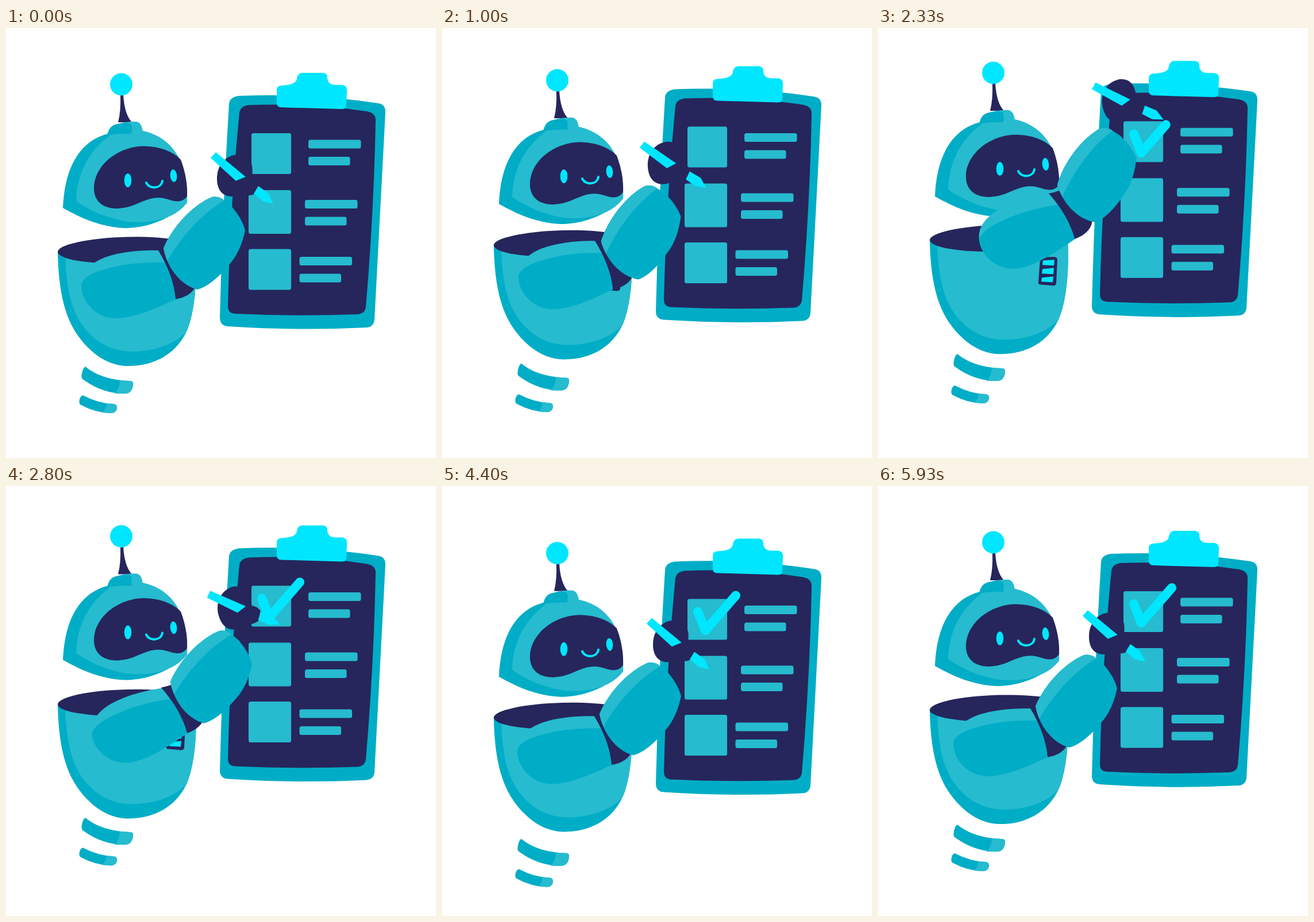
Animation of 748 by 748 pixels, one loop 5990 ms. Source, as an HTML page:

```html
<!DOCTYPE html>
<html lang="en">
<head>
<meta charset="utf-8">
<title>Robot with checklist</title>
<style>
  html, body { margin: 0; width: 100%; height: 100%; overflow: hidden; background: #fff; }
  svg { display: block; width: 100vw; height: 100vh; }
  .navy { fill: #26265c; }
  .teal { fill: #00adc6; }
  .light { fill: #26bbcf; }
  .cyan { fill: #00e6ff; }
  .line { fill: none; stroke: #00e6ff; stroke-linecap: round; stroke-linejoin: round; }
</style>
</head>
<body>
<svg viewBox="0 0 748 748">
  <g id="board">
    <path class="teal" d="M405 118Q530 113 648 131Q660 133 660 146L641 507Q640 520 627 521Q505 527 386 519Q372 518 372 504Q377 310 388 132Q389 120 405 118Z"/>
    <path class="navy" d="M422 134Q530 130 628 145Q643 148 643 160Q640 320 626 485Q625 496 613 498Q505 502 398 497Q386 496 386 484Q390 310 406 147Q408 136 422 134Z"/>
    <path class="cyan" d="M516 78H550Q559 78 559 86Q559 99 574 99H585Q594 100 593 110L592 134Q592 141 585 141L479 138Q471 138 471 130V108Q471 100 480 100Q506 99 506 87Q508 78 516 78Z"/>
    <g id="rows" class="light"></g>
    <path id="check" class="line" stroke-width="16" pathLength="1" d="M445 205L458 238L511 177"/>
  </g>

  <g id="coilTop">
    <path class="teal" d="M138 589Q165 612 216 614Q222 614 221 621Q219 636 207 636Q168 636 135 612Q130 610 132 601Q134 591 138 589Z"/>
    <path class="light" d="M198 613L216 614Q222 614 221 621Q219 636 207 636H189Q198 626 198 613Z"/>
  </g>
  <g id="coilLow">
    <path class="teal" d="M134 639Q160 653 188 654Q194 655 193 662Q191 670 182 670Q155 669 131 656Q126 654 128 646Q130 639 134 639Z"/>
    <path class="light" d="M175 653L188 654Q194 655 193 662Q191 670 182 670L167 669Q175 662 175 653Z"/>
  </g>

  <g id="body">
    <path class="teal" d="M90 388C91 450 100 500 125 535C147 566 178 588 212 588C255 588 294 570 314 528C328 497 333 440 330 388Z"/>
    <path class="light" d="M103 396C105 450 112 490 135 520C160 552 190 563 222 563C262 562 295 549 314 528C328 497 333 440 330 388Z"/>
    <ellipse class="navy" cx="210" cy="386.500" rx="120" ry="23" transform="rotate(-1.500 210 386.500)"/>
    <path class="navy" d="M286 419H308Q312 420 312 424L310 465Q309 469 305 469L282 467Q278 467 279 462L282 423Q283 419 286 419Z"/>
    <path class="cyan" d="M287 425L307 424L306 434L286 433ZM286 440L306 438L305 449L285 448ZM285 455L305 453L304 463L284 462Z"/>
  </g>

  <g id="head">
    <path class="navy" d="M199 116H204Q206 150 219 164H195Q200 145 199 116Z"/>
    <circle class="cyan" cx="200.5" cy="98" r="19.5"/>
    <path class="teal" d="M99 313C102 240 130 196 177 184L238 179C295 192 317 240 315 304C289 330 250 348 206 348C165 346 133 332 99 313Z"/>
    <path class="light" d="M185 184C143 212 123 255 122 301C153 323 195 338 228 338C252 338 270 334 288 326Q304 318 315 304C317 240 295 192 238 179Z"/>
    <path class="light" d="M177 187Q179 170 194 167Q212 162 228 163Q237 166 238 182Z"/>
    <path class="teal" d="M176 187Q179 169 194 167Q212 163 217 167Q220 172 218 184Q196 183 176 187Z"/>
    <path class="navy" d="M153 276C155 238 195 206 240 205.500C268 206 291 215 304 229C312 250 316 272 315 293C308 302 300 303 288 300C272 294 262 294 248 298C226 305 216 314 190 314C165 313 152 298 153 276Z"/>
    <ellipse class="cyan" cx="212" cy="265" rx="6.300" ry="12"/>
    <ellipse class="cyan" cx="291.500" cy="257" rx="5.800" ry="11" transform="rotate(-5 291.500 257)"/>
    <path class="line" stroke-width="4" d="M244 269C249 281 270 280 272 266"/>
  </g>

  <g id="arm">
    <g id="upper">
      <path class="navy" d="M264 386Q274 386 284 384L330 448Q323 467 294 472Z"/>
      <path class="light" d="M131 447C131 422 150 407 175 398C202 389 235 386 265 387Q291 430 295 472C260 488 222 505 190 505C155 504 131 475 131 447Z"/>
      <path class="teal" d="M131 447C133 430 165 420 200 413Q235 407 276 408Q292 440 295 472C260 488 222 505 190 505C155 504 131 475 131 447Z"/>
    </g>
    <g id="hand">
      <path class="navy" d="M367 262C367 238 383 220 405 220C424 222 431 235 428 256C425 282 411 293 391 293C375 292 367 280 367 262Z"/>
      <path class="cyan" d="M365 216L417 259L400 266L356 226Z"/>
      <path class="navy" d="M400 266L417 259Q434 260 439 273Q438 281 432 289Q416 295 404 287Z"/>
      <path class="cyan" d="M431 288L439 275L457 288L465 306L446 301Z"/>
    </g>
    <g id="forearm">
      <path class="teal" d="M274 383C290 345 325 308 358 294Q372 291 393 311Q411 332 416 352Q408 390 388 412Q358 448 333 455C300 446 279 412 274 383Z"/>
      <path class="light" d="M274 383C290 345 325 308 358 294Q370 291 380 300C346 319 306 360 281 405Q276 395 274 383Z"/>
    </g>
  </g>
</svg>
<script>
const $ = id => document.getElementById(id);
const LOOP = 5990;

const mix = (a, b, s) => a + (b - a) * s;
const ramp = (t, from, to) => Math.min(1, Math.max(0, (t - from) / (to - from)));
const smooth = (t, from, to) => {
  const s = ramp(t, from, to);
  return s * s * (3 - 2 * s);
};

// Rise, sink and settle; parts with a lag follow the body late and drop back faster
function bob(t, lag, rise, sink) {
  const top = 2000 + 0.35 * lag, bottom = 4000 + 0.6 * lag;
  const settle = lag ? ramp(t, bottom, 5900) ** 2 : smooth(t, bottom, 6000);
  return mix(mix(0, -rise, smooth(t, lag, top)), sink, smooth(t, top, bottom)) * (1 - settle);
}

// Arm parts turn around their pivot: [x, y, degrees] at rest, raised to the box, swept off it
const ARM = {
  upper: { rest: [280, 429.5, 0], raised: [298, 367.5, -10], swept: [293, 400.5, -10], reach: 0.7 },
  forearm: { rest: [346, 371, 0], raised: [349, 295, -11], swept: [358, 338.5, 0.5], reach: 0.85 },
  hand: { rest: [360, 221, 0], raised: [332, 146.5, -11.5], swept: [352, 198, -16], reach: 1 }
};
const REACH = [43, -58, 0];

const shift = (id, y) => $(id).setAttribute("transform", `translate(0 ${y})`);

function drawArm(t) {
  const lift = smooth(t, 820, 1800);
  const lean = smooth(t, 300, 1800);
  const sweep = smooth(t, 1900, 2800);
  const back = smooth(t, 2800, 3500);
  const stretch = smooth(t, 2050, 2400) - smooth(t, 2400, 2800);

  for (const [id, { rest, raised, swept, reach }] of Object.entries(ARM)) {
    const [x, y, turn] = rest.map((home, axis) => {
      // The lower arm tilts before it lifts
      const up = axis === 1 || id === "upper" ? lift : lean;
      const out = mix(mix(home, raised[axis], up), swept[axis], sweep);
      return mix(out, home, back) + REACH[axis] * reach * stretch;
    });
    $(id).setAttribute("transform",
      `translate(${x} ${y}) rotate(${turn}) translate(${-rest[0]} ${-rest[1]})`);
  }
}

function draw(t) {
  const bodyY = bob(t, 0, 23, 15);
  for (const id of ["board", "body", "arm"]) shift(id, bodyY);
  shift("head", bob(t, 300, 21, 19));
  shift("coilTop", bob(t, 450, 22.5, 25));
  shift("coilLow", bob(t, 700, 17, 27.5));
  drawArm(t);

  const drawn = smooth(t, 1800, 2450);
  $("check").style.display = drawn > 0 ? "" : "none";
  $("check").setAttribute("stroke-dasharray", `${drawn} 2`);
}

const rect = (x, y, w, h) => `<rect x="${x}" y="${y}" width="${w}" height="${h}" rx="3.5"/>`;
const row = (left, top, height, barX, barY) =>
  rect(left, top, 496 - left, height) + rect(barX, barY, 91.5, 15) + rect(barX, barY + 29.5, 72.5, 15);
$("rows").innerHTML =
  row(427, 183, 71, 526, 194.5) + row(422, 282, 76, 520, 299) + row(422, 384.5, 71, 510.5, 398);

// Ten poses a second, held alternately for 130 and 70 ms
function stepTime(ms) {
  const t = ms % LOOP;
  return Math.floor(t / 200) * 200 + (t % 200 >= 130 ? 100 : 0);
}

const start = performance.now();
function tick() {
  draw(stepTime(performance.now() - start));
  requestAnimationFrame(tick);
}
tick();
</script>
</body>
</html>
```
